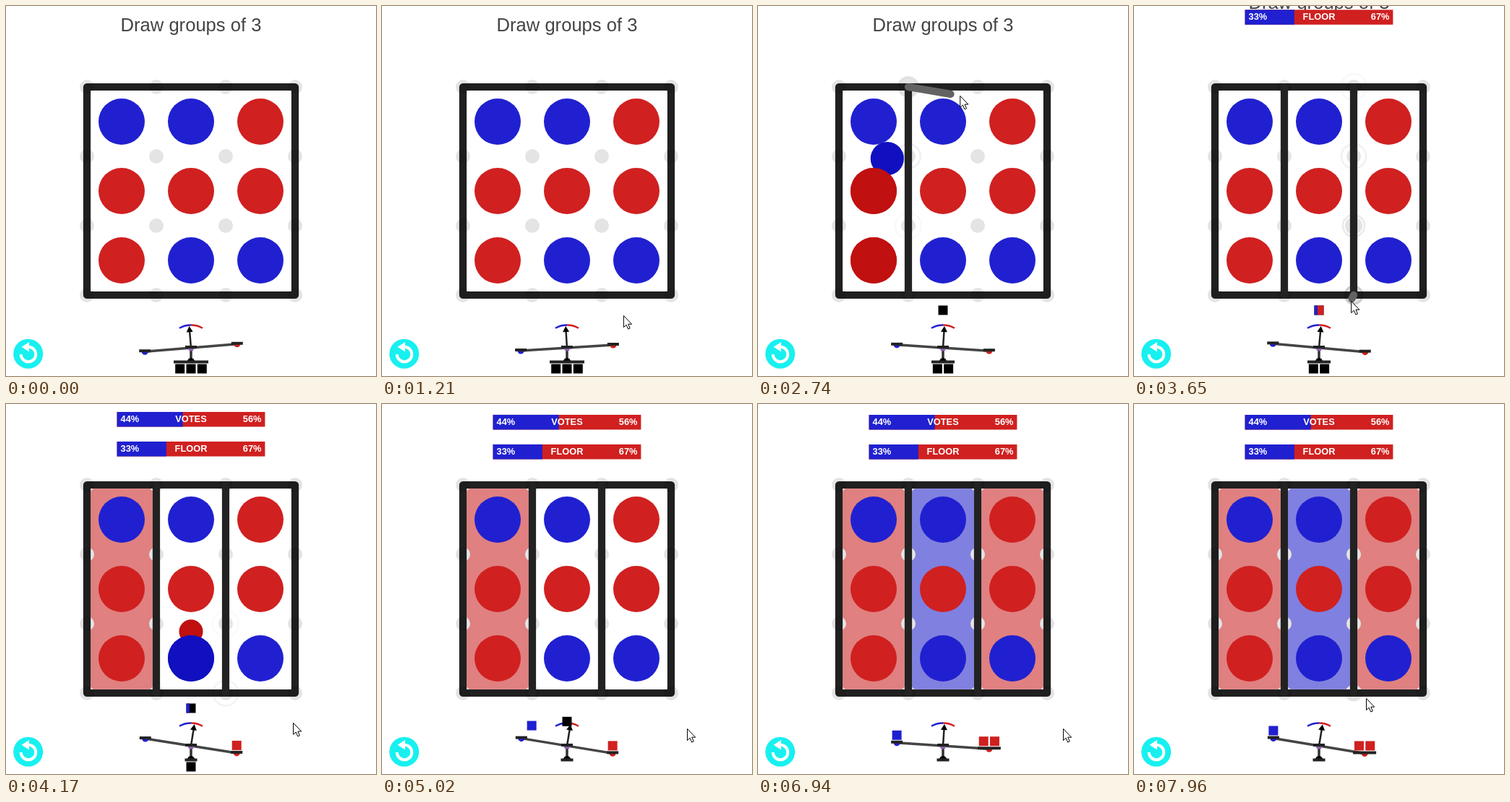
These frames come from a looping animation (512x512 px, 8 s). An HTML page with a canvas:

```html
<!DOCTYPE html>
<html lang="en">
<head>
<meta charset="utf-8">
<title>Draw groups of 3</title>
<style>
html, body { margin: 0; width: 100%; height: 100%; overflow: hidden; background: #fff; }
canvas { display: block; }
</style>
</head>
<body>
<canvas id="stage" width="512" height="512"></canvas>
<script>
const ctx = document.getElementById('stage').getContext('2d');
const LOOP = 8000;
const FONT = '"Liberation Sans", Arial, sans-serif';
const BLUE = '#2020d0', RED = '#d02020', INK = '#222';
const COLOR = { B: BLUE, R: RED }, DARK = { B: '#1010c0', R: '#c01010' };
const CELL = 96, EDGE = 112, WALL = 10.24;
const post = i => EDGE + CELL * i;
const middle = i => post(i) + CELL / 2;

// Each column elects one seat: its block rises, fills with votes, then flies to a pan.
const FIRST_RISE = 2579, TURN = 1163, MOVE = 150, VOTE_DELAY = 117, VOTE = 230;
const HOME = { x: 256, y: 421 };
const seats = ['BRR', 'BRB', 'RRB'].map((votes, i) => ({
  votes,
  x: middle(i),
  side: votes.split('R').length > 2 ? 1 : -1,
  rise: FIRST_RISE + TURN * i,
  fly: FIRST_RISE + TURN * (i + 1)
}));

// The pointer draws one divider upwards, then one downwards.
const touches = [0, 1, 2, 3].map(i => ({ t: 1560 + 310 * i, x: post(1), y: post(3 - i) }))
  .concat([0, 1, 2, 3].map(i => ({ t: 2840 + 230 * i, x: post(2), y: post(i) })));
const RESULTS = 3529, DRAW_END = 3690, POINTER_START = 1000;
const key = (t, x, y) => ({ t, x, y });
const pointerPath = [
  key(POINTER_START, 410, 445), key(2085, 242, 262), key(2130, 234, 246), key(2740, 279, 124),
  key(3650, 300, 408), key(4000, 364, 430), key(4300, 422, 449),
  key(7180, 422, 449), key(7850, 321, 407), key(LOOP, 321, 407),
  ...touches
].sort((a, b) => a.t - b.t);

const clamp = v => Math.max(0, Math.min(1, v));
const mix = (a, b, k) => a + (b - a) * k;
const settle = (age, tau) => age > 0 ? 1 - Math.exp(-age / tau) : 0;
const flight = (seat, t) => clamp((t - seat.fly) / MOVE);

function pointerAt(t) {
  const next = pointerPath.findIndex(p => p.t > t);
  if (next <= 0) return pointerPath[0];
  const a = pointerPath[next - 1], b = pointerPath[next], k = (t - a.t) / (b.t - a.t);
  return { x: mix(a.x, b.x, k), y: mix(a.y, b.y, k) };
}

// A slow sway plus the weight of the seats already landed.
function tiltAt(t) {
  const sway = .09 * Math.sin(.00103 * t - 2.01);
  return seats.reduce((sum, s) => sum + s.side * .175 * settle(t - s.fly - MOVE, 400), sway);
}

function disc(x, y, r, fill, from = 0, to = 2 * Math.PI) {
  ctx.fillStyle = fill;
  ctx.beginPath();
  ctx.arc(x, y, r, from, to);
  ctx.fill();
}

function arc(x, y, r, from, to, stroke, width) {
  ctx.strokeStyle = stroke;
  ctx.lineWidth = width;
  ctx.beginPath();
  ctx.arc(x, y, r, from, to);
  ctx.stroke();
}

function line(x1, y1, x2, y2, stroke, width, cap = 'round') {
  ctx.strokeStyle = stroke;
  ctx.lineWidth = width;
  ctx.lineCap = cap;
  ctx.beginPath();
  ctx.moveTo(x1, y1);
  ctx.lineTo(x2, y2);
  ctx.stroke();
  ctx.lineCap = 'butt';
}

function polygon(points, fill) {
  ctx.beginPath();
  points.forEach(([x, y]) => ctx.lineTo(x, y));
  ctx.closePath();
  ctx.fillStyle = fill;
  ctx.fill();
}

function rect(x, y, w, h, fill) {
  ctx.fillStyle = fill;
  ctx.fillRect(x, y, w, h);
}

function text(str, x, y, font, fill, align) {
  ctx.font = `${font} ${FONT}`;
  ctx.fillStyle = fill;
  ctx.textAlign = align;
  ctx.fillText(str, x, y);
}

const block = (x, y, fill) => rect(x - 6.5, y - 6.5, 13, 13, fill);
const plate = (x, y, half) => line(x - half, y, x + half, y, INK, 4, 'butt');

function bar(label, share, y) {
  const x = 153.6, w = 204.8, font = 'bold 12.8px';
  const blue = Math.round(share * 100);
  rect(x, y, w, 20.5, RED);
  rect(x, y, w * share, 20.5, BLUE);
  text(blue + '%', x + 5, y + 14, font, '#fff', 'left');
  text(label, 256, y + 14, font, '#fff', 'center');
  text(100 - blue + '%', x + w - 5, y + 14, font, '#fff', 'right');
}

function header(t) {
  const shown = settle(t - RESULTS, 205);
  text('Draw groups of 3', 256, 35 - 70 * shown, '25.6px', '#444', 'center');
  if (!shown) return;
  bar('VOTES', 4 / 9, 15 - 92 * (1 - shown));
  bar('FLOOR', 1 / 3, 56 - 92 * (1 - shown));
}

function posts(t, pointer) {
  for (let i = 0; i < 16; i++) {
    const x = post(i % 4), y = post(i >> 2);
    const touch = touches.find(p => p.x === x && p.y === y && t >= p.t);
    const near = touch && t > DRAW_END && Math.hypot(pointer.x - x, pointer.y - y) < 24;
    const pulse = touch ? 4 * (1 - clamp((t - touch.t) / 500) ** 2) : 0;
    disc(x, y, 10 + Math.max(pulse, near ? 1.5 : 0), '#e4e4e4');
  }
  for (const p of touches) {
    const k = (t - p.t) / 900;
    if (k > 0 && k < 1) arc(p.x, p.y, 18 - 8 * (1 - k) ** 2, 0, 7, `rgba(0,0,0,${.11 * (1 - k) + .02})`, 2.5);
  }
}

function voters(t, pointer) {
  for (const s of seats) [...s.votes].forEach((v, i) => {
    const hover = t > POINTER_START && Math.hypot(pointer.x - s.x, pointer.y - middle(i)) < 32;
    disc(s.x, middle(i), 32, (hover ? DARK : COLOR)[v]);
  });
}

function walls(t) {
  const stroke = 'rgba(0,0,0,.875)';
  ctx.lineJoin = 'round';
  ctx.strokeStyle = stroke;
  ctx.lineWidth = WALL;
  ctx.strokeRect(EDGE, EDGE, 3 * CELL, 3 * CELL);
  for (const x of [post(1), post(2)]) {
    const ys = touches.filter(p => p.x === x && p.t <= t).map(p => p.y);
    if (ys.length > 1) line(x, Math.min(...ys), x, Math.max(...ys), INK, WALL);
  }
}

function flyingVotes(t) {
  for (const s of seats) [...s.votes].forEach((v, i) => {
    const age = t - s.rise - VOTE_DELAY, k = clamp(age / VOTE - i);
    if (age < 0 || k === 1) return;
    disc(mix(s.x, HOME.x, k), mix(middle(i), HOME.y, k), 32 * (1 - k) ** 1.5, DARK[v]);
  });
}

function board(t, pointer) {
  const inset = WALL / 2, size = CELL - WALL;
  for (const s of seats)
    if (flight(s, t) === 1)
      rect(s.x - size / 2, EDGE + inset, size, 3 * CELL - WALL, s.side > 0 ? '#e08080' : '#8080e0');
  posts(t, pointer);
  voters(t, pointer);
  walls(t);
  flyingVotes(t);
}

function risingBlock(seat, t) {
  const y = mix(502, HOME.y, clamp((t - seat.rise) / MOVE));
  const counted = Math.max(0, Math.floor((t - seat.rise - VOTE_DELAY) / VOTE));
  const tally = [...seat.votes.slice(0, counted)];
  const blue = tally.filter(v => v === 'B').length * 13 / 3;
  const red = tally.length * 13 / 3 - blue;
  block(HOME.x, y, '#000');
  rect(HOME.x - 6.5, y - 6.5, blue, 13, BLUE);
  rect(HOME.x + 6.5 - red, y - 6.5, red, 13, RED);
}

function pan(side, x, y, t) {
  const color = side < 0 ? BLUE : RED;
  const won = seats.filter(s => s.side === side && t >= s.fly);
  const load = won.reduce((sum, s) => sum + flight(s, t), 0);
  const width = Math.max(1, load);
  disc(x, y + 1, 4.5, color, 0, Math.PI);
  plate(x, y, 8 * width);
  won.forEach((s, slot) => {
    const k = flight(s, t), offset = 15.3 * (slot - (width - 1) / 2);
    block(mix(HOME.x, x + offset, k), mix(HOME.y, y - 9.5, k), color);
  });
}

function scale(t) {
  const tilt = tiltAt(t), x = 256, y = 473;
  const dx = 64 * Math.cos(tilt), dy = 64 * Math.sin(tilt);

  arc(x, y + .5, 32, -Math.PI * 2 / 3, -Math.PI / 2, BLUE, 2.5);
  arc(x, y + .5, 32, -Math.PI / 2, -Math.PI / 3, RED, 2.5);

  const stock = seats.filter(s => t < s.rise).length;
  for (let i = 0; i < stock; i++) block(x + 15.3 * (i - (stock - 1) / 2), 502, '#000');
  line(x, y, x, 491, '#333', 3.5);
  disc(x, 492, 5, '#000', Math.PI, 2 * Math.PI);
  plate(x, 492.5, Math.max(8.5, 8 * stock));

  line(x - dx, y - dy, x + dx, y + dy, '#444', 3.5);
  disc(x, y, 4.5, '#9060b0', 0, Math.PI);
  plate(x, y - 1, 8);
  ctx.save();
  ctx.translate(x, y);
  ctx.rotate(tilt);
  line(0, 0, 0, -24, INK, 2.5);
  polygon([[0, -30], [4.5, -22], [-4.5, -22]], '#000');
  ctx.restore();

  for (const side of [-1, 1]) pan(side, x + side * dx, y - 1 + side * dy, t);
  for (const s of seats) if (t >= s.rise && t < s.fly) risingBlock(s, t);
}

function resetButton() {
  disc(30.7, 481.3, 20.5, '#18f0f0');
  arc(31, 482, 10.3, -Math.PI / 2, Math.PI, '#fff', 4);
  polygon([[21.5, 471.7], [32, 465], [32, 478.5]], '#fff');
}

function pointerLine(t) {
  const last = touches.filter(p => p.t <= t).pop();
  if (!last || t > DRAW_END) return;
  const end = pointerAt(Math.max(last.t, t - 45));
  line(last.x, last.y, end.x, end.y, '#636363', WALL);
}

function arrow({ x, y }) {
  ctx.save();
  ctx.translate(x + .5, y + .5);
  ctx.lineJoin = 'miter';
  polygon([[0, 0], [0, 16], [3.7, 12.7], [6.2, 18.5], [8.8, 17.4], [6.3, 11.7], [11.2, 11.7]], '#fff');
  ctx.strokeStyle = '#000';
  ctx.lineWidth = 1;
  ctx.stroke();
  ctx.restore();
}

function frame() {
  const t = performance.now() % LOOP;
  const pointer = pointerAt(t);
  rect(0, 0, 512, 512, '#fff');
  header(t);
  board(t, pointer);
  scale(t);
  resetButton();
  pointerLine(t);
  if (t >= POINTER_START) arrow(pointer);
  requestAnimationFrame(frame);
}
frame();
</script>
</body>
</html>
```
